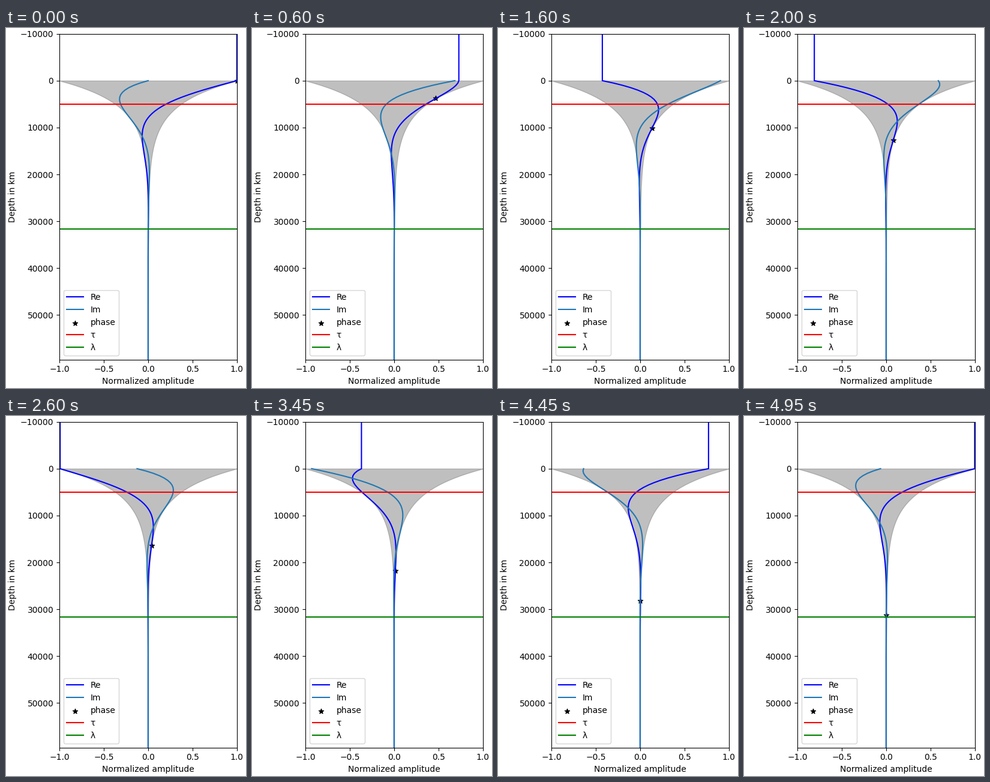
Recreate the animation shown at these times as a matplotlib script. Size 400 by 600 pixels, loop 5000 ms.

```python
import matplotlib.pyplot as plt
import numpy as np
from matplotlib.animation import FuncAnimation

FRAMES = 100
INTERVAL = 50
WAVELENGTH = np.sqrt(1e9)  # km
SKIN_DEPTH = WAVELENGTH / (2 * np.pi)

depth = np.arange(-10000, 60000, 500)
ground = depth[depth >= 0]
envelope = np.exp(-ground / SKIN_DEPTH)


def field(phase):
    """Complex amplitude of the damped wave below the surface."""
    return envelope * np.exp(1j * (phase - ground / SKIN_DEPTH))


fig, ax = plt.subplots(figsize=(4, 6), dpi=100, layout="constrained")
ax.fill_betweenx(ground, -envelope, envelope, color="gray", alpha=0.5)
re_line, = ax.plot([], [], color="blue", label="Re")
im_line, = ax.plot([], [], color="C0", label="Im")
star = ax.scatter([1], [0], marker="*", color="black", label="phase")
ax.axhline(SKIN_DEPTH, color="red", label="τ")
ax.axhline(WAVELENGTH, color="green", label="λ")

ax.set_xlim(-1, 1)
ax.set_ylim(depth[-1], depth[0])
ax.set_xlabel("Normalized amplitude")
ax.set_ylabel("Depth in km")
ax.legend(loc="lower left")

# Settle the layout once, then keep it fixed.
fig.draw_without_rendering()
fig.set_layout_engine("none")


def update(frame):
    turn = frame / FRAMES
    phase = 2 * np.pi * turn
    wave = field(phase)
    air = np.full(len(depth) - len(ground), np.cos(phase))
    re_line.set_data(np.concatenate([air, wave.real]), depth)
    im_line.set_data(wave.imag, ground)
    star.set_offsets([[np.exp(-phase), turn * WAVELENGTH]])
    return re_line, im_line, star


anim = FuncAnimation(fig, update, frames=FRAMES, interval=INTERVAL,
                     repeat=True, repeat_delay=0)
plt.show()
```
